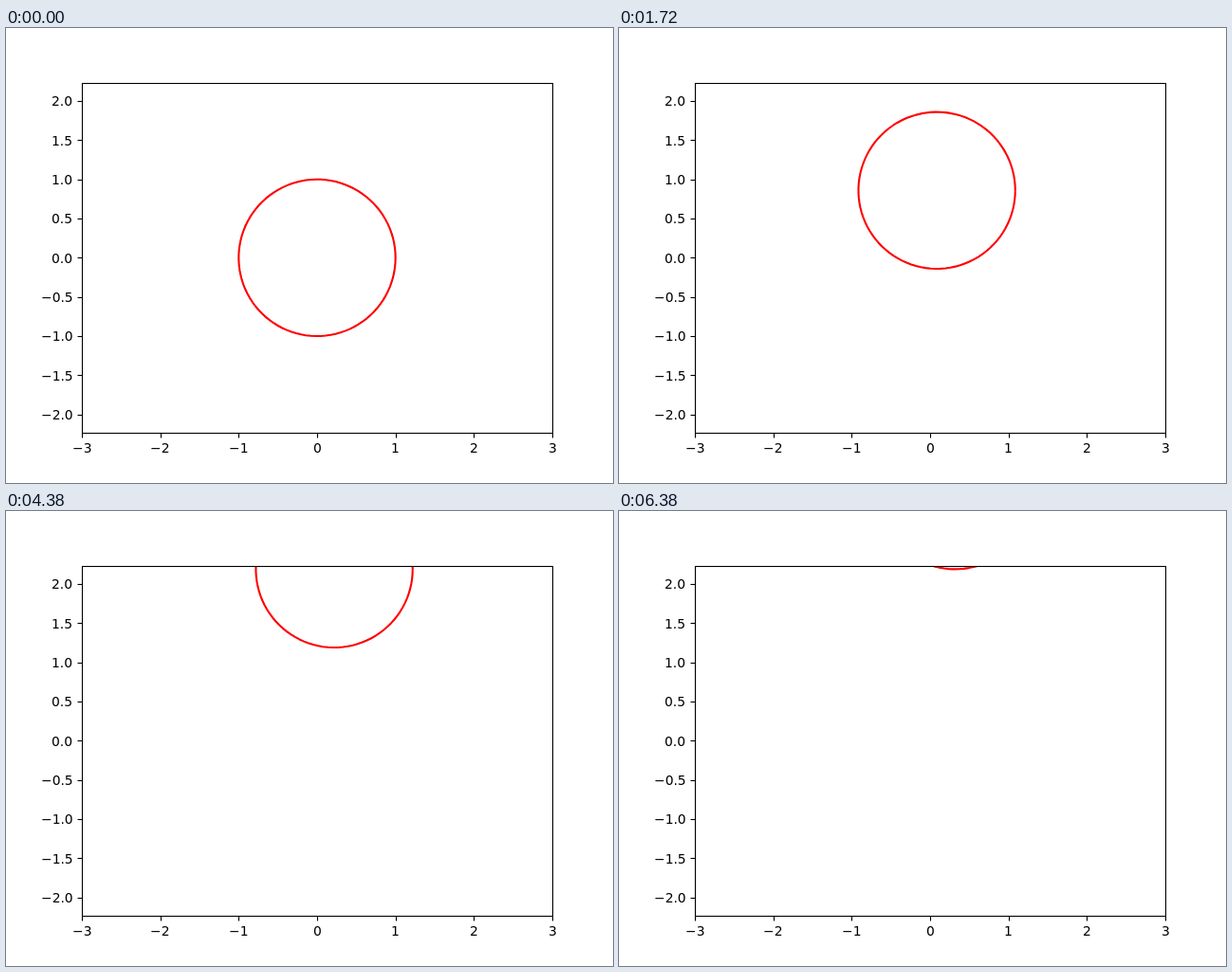
Write an HTML page with a canvas that moves like this. It is 640x480 px and loops after 6.4 s.

```html
<!DOCTYPE html>
<html lang="en">
<head>
<meta charset="utf-8">
<title>Moving circle plot</title>
<style>
  html, body { margin: 0; width: 100%; height: 100%; overflow: hidden; background: #fff; }
  canvas { display: block; }
</style>
</head>
<body>
<canvas id="plot" width="640" height="480"></canvas>
<script>
const ctx = document.getElementById('plot').getContext('2d');
const STEP = 20, STEPS = 320;          // ms per step, steps per loop
const SCALE = 496 / 6;                 // pixels per data unit
const LEFT = 80, RIGHT = 576, TOP = 58, BOTTOM = 427;
const POINTS = 100;

const toX = x => 328 + x * SCALE;
const toY = y => 242.4 - y * SCALE;
const crisp = v => Math.round(v) + 0.5;

function line(x1, y1, x2, y2) {
  ctx.beginPath();
  ctx.moveTo(x1, y1);
  ctx.lineTo(x2, y2);
  ctx.stroke();
}

// align: 1 puts the right end of the text at x, 0.5 its middle
function label(value, digits, x, y, align) {
  const text = value.toFixed(digits).replace('-', '\u2212');
  ctx.fillText(text, Math.round(x - ctx.measureText(text).width * align), Math.round(y));
}

function drawCircle(cx, cy) {
  ctx.save();
  ctx.beginPath();
  ctx.rect(LEFT, TOP, RIGHT - LEFT, BOTTOM - TOP);
  ctx.clip();
  ctx.beginPath();
  for (let i = 0; i < POINTS; i++) {
    const a = 2 * Math.PI * i / (POINTS - 1);
    ctx.lineTo(toX(cx + Math.cos(a)), toY(cy + Math.sin(a)));
  }
  ctx.strokeStyle = '#f00';
  ctx.lineWidth = 2.083;
  ctx.lineCap = 'square';
  ctx.lineJoin = 'round';
  ctx.stroke();
  ctx.restore();
}

function drawAxes() {
  ctx.strokeStyle = ctx.fillStyle = '#000';
  ctx.lineWidth = 1.11;
  ctx.font = '13.889px "DejaVu Sans", sans-serif';
  for (let x = -3; x <= 3; x++) {
    const px = crisp(toX(x));
    line(px, BOTTOM + 0.5, px, BOTTOM + 5.5);
    label(x, 0, toX(x), 448, 0.5);
  }
  for (let y = -2; y <= 2; y += 0.5) {
    const py = crisp(toY(y));
    line(LEFT - 4.5, py, LEFT + 0.5, py);
    label(y, 1, 70.28, toY(y) + 5.28, 1);
  }
  ctx.strokeRect(LEFT + 0.5, TOP + 0.5, RIGHT - LEFT, BOTTOM - TOP);
}

function frame() {
  const n = Math.floor(performance.now() / STEP) % STEPS;
  ctx.fillStyle = '#fff';
  ctx.fillRect(0, 0, 640, 480);
  drawCircle(n * 0.001, n * 0.01);
  drawAxes();
  requestAnimationFrame(frame);
}
frame();
</script>
</body>
</html>
```
